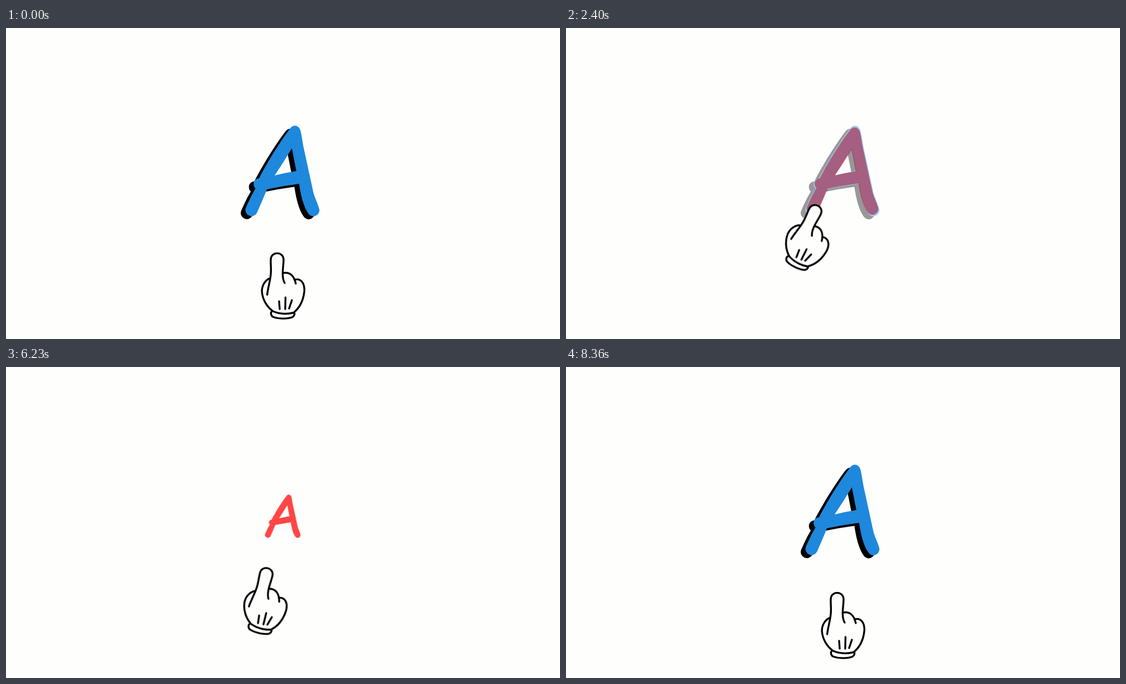
Recreate the animation shown at these times as an HTML page. Size 998x561 px, loop 8.66 s.

```html
<!DOCTYPE html>
<html lang="en">
<head>
<meta charset="utf-8">
<title>Touch the letter</title>
<style>
  html, body { margin: 0; width: 100%; height: 100%; overflow: hidden; background: #fefefd; }
  svg { display: block; width: 100%; height: 100%; }

  /* a sine-like ease for every segment unless a keyframe says otherwise */
  .blue, .red, .hand, .horn { animation: 8.66s cubic-bezier(.3642, 0, .6358, 1) infinite; }
  .blue, .red { transform-origin: 499px 280px; }
  .blue { animation-name: blue; }
  .red  { animation-name: red; }
  .horn { animation-name: horn; }
  .hand { animation-name: hand; transform-origin: 499px 466px; }

  /* fades away over the red letter, later grows back */
  @keyframes blue {
    0% { opacity: 1; transform: scale(1); }
    23.095% { opacity: 1; transform: scale(1); animation-timing-function: linear; }
    30.797%, 84.641% { opacity: 0; transform: scale(1); }
    84.642% { opacity: 1; transform: scale(0); }
    96.536%, 100% { opacity: 1; transform: scale(1); }
  }
  @keyframes red {
    0%, 23.095% { opacity: 0; transform: scale(1); }
    23.096%, 66.13% { opacity: 1; transform: scale(1); }
    77.71%, 100% { opacity: 1; transform: scale(0); }
  }
  @keyframes horn {
    0%, 30.797% { opacity: 0; }
    42.344%, 54.654% { opacity: 1; }
    66.2%, 100% { opacity: 0; }
  }
  @keyframes hand {
    0%, 11.547% { transform: translate(0, 0) rotate(0deg); }
    23.095%, 66.13% { transform: translate(-61.2px, -87px) rotate(25deg); }
    77.71%, 100% { transform: translate(0, 1px) rotate(0deg); }
  }
</style>
</head>
<body>
<svg viewBox="0 0 998 561">
  <defs>
    <path id="letter" fill-rule="evenodd" d="M432 324.500C438 311 444 298 449.500 289.500C443 283 446 272 456 271
      C470 243 495 203 512 181C517 174 528 174 531 187C533 196 534 205 536 215L554 298
      C557 308 561 315 563.500 324A10.500 10.500 0 0 1 544 333.500C536 322 531 302 528 281
      Q498 285 470 291C465 304 458 320 452 333.500A11 11 0 0 1 432 324.500Z
      M515 217Q500 242 484 266Q504 261 523 258Z"/>
    <filter id="soft" x="-20%" y="-20%" width="140%" height="140%">
      <feDropShadow dx="3" dy="4" stdDeviation="2.5" flood-color="#000" flood-opacity=".35"/>
    </filter>
  </defs>

  <g class="red">
    <use href="#letter" fill="#ff4545" transform="translate(500 264) scale(.97 .965) translate(-500 -264)"/>
  </g>

  <g class="blue">
    <use href="#letter" x="-8.500" y="5.500" fill="#000"/>
    <use href="#letter" fill="#1e88dc"/>
  </g>

  <g class="horn">
    <path fill="#445c99" d="M651 291H674L685 356Q685.500 361 680 361H669Q661 361 660 353Z"/>
    <path fill="#3c5189" d="M669 291H674L685 356Q685.500 361 680 361H678Z"/>
    <path fill="#3f6fb3" d="M638 257H636Q629 259 629 270.500Q629 282 636 284H638Z"/>
    <path fill="#87c6ee" d="M642 254H639Q637 255 637 258V283Q637 285 639 286H642Z"/>
    <path fill="#4a90d0" d="M681 248H647Q642 248 642 254V287Q642 293 647 293H681Z"/>
    <path fill="#4785c2" d="M642 272H681V293H647Q642 293 642 287Z"/>
    <path fill="#87c6ee" d="M681 248L763 204V272H681Z"/>
    <path fill="#7cb2d6" d="M681 272H763V338L681 292Z"/>
    <path fill="#4a90d0" d="M771 254.500L784 256V288L771 290Z"/>
    <path fill="#4785c2" d="M771 272H784V288L771 290Z"/>
    <rect x="763" y="200" width="8" height="143" rx="4" fill="#3f6fb5"/>
    <path filter="url(#soft)" fill="none" stroke="#f00" stroke-width="9" stroke-linecap="round"
      d="M789 217.500L846 204.500M796 271.500L855 273M790.500 322L846 342"/>
  </g>

  <g class="hand" fill="#fefefd" stroke="#000" stroke-width="3.400" stroke-linecap="round" stroke-linejoin="round">
    <path d="M480 510C475 514 478 520 482 521.500C492 525 508 525 516 521.500C520 519 521 515 518 511"/>
    <path stroke="none" d="M477 418C477 402 500 402 500 418L499 442C510 440 518 446 520 454
      C533 451 538 462 537.500 472C536 490 530 504 519 513Q500 519 481 511C470 503 461 490 461 474C462 464 467 456 474 452Z"/>
    <path fill="none" d="M474 452C466 456 461 465 461 475C462 490 470 503 481 511Q499 518.500 518 513.500
      C530 504 536 490 537.500 474C538 460 531 451 520 454"/>
    <path fill="none" d="M470.500 481C472 468 476 456 477 444C478 434 476.500 426 477 418
      C477 402.500 500 402.500 500 418C500 428 498 436 498.500 446Q499 455 502 460"/>
    <path fill="none" d="M499 442C511 439.500 519 447 522 461M492 493L493 507M503.500 486L503 507M515 491L510 506"/>
  </g>
</svg>
</body>
</html>
```
